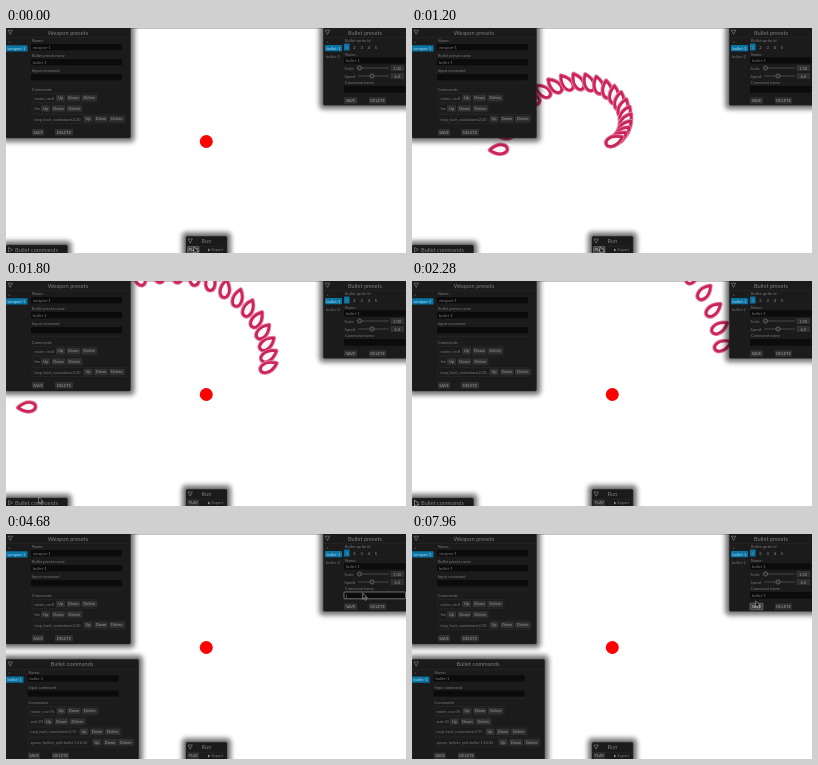
Write an HTML page that moves like this. It is 400 px wide and 225 px high and loops after 8000 ms.

```html
<!DOCTYPE html>
<html>
<head>
<meta charset="utf-8">
<style>
html, body { margin: 0; width: 100%; height: 100%; overflow: hidden; background: #fff; }
svg { display: block; width: 100vw; height: 100vh; }
text { font: 4px Lato, "Open Sans", sans-serif; fill: #787878; white-space: pre; }
.title { font-size: 5.7px; fill: #7c7c7c; text-anchor: middle; }
.button { text-anchor: middle; fill: #979797; }
.hot rect { fill: #404040; stroke: #8c8c8c; stroke-width: .5; }
.hot text { fill: #ccc; }
</style>
</head>
<body>
<svg id="stage" viewBox="0 0 400 225">
  <defs>
    <filter id="blur" x="-50%" y="-50%" width="200%" height="200%"><feGaussianBlur stdDeviation="2.8"/></filter>
    <path id="leaf" d="M9 0C4 -4 -1 -5 -4.5 -4C-9.5 -2.5 -9.5 2.5 -4.5 4C-1 5 4 4 9 0Z" stroke-linejoin="round"/>
    <g id="drop">
      <use href="#leaf" fill="#fff" stroke="#e27c9c" stroke-width="4.6"/>
      <use href="#leaf" fill="#fff6f8" stroke="#cb2459" stroke-width="2.7"/>
    </g>
  </defs>
  <rect width="400" height=".7" fill="#aaa"/>
  <circle id="ball" cx="200.3" cy="113.5" r="6.5" fill="#f00"/>
  <g id="bullets"></g>
  <g id="panels"></g>
  <path id="cursor" d="M0 0V6.2L1.5 4.9L2.6 7.3L3.7 6.8L2.7 4.5H4.6Z" fill="#111" stroke="#ccc" stroke-width=".5"/>
</svg>
<script>
const $ = id => document.getElementById(id);
const BLUE = '#0a74a4', FIELD = '#0b0b0b', EDGE = '#2e2e2e';

const rect = (x, y, w, h, fill, more = '') =>
  `<rect x="${x}" y="${y}" width="${w}" height="${h}" fill="${fill}" ${more}/>`;
const text = (x, y, s, more = '') => `<text x="${x}" y="${y}" ${more}>${s}</text>`;
const button = (x, y, w, s, id = '') =>
  `<g id="${id}">${rect(x, y, w, 6.5, '#313131', 'rx=".7"')}${text(x + w / 2, y + 4.7, s, 'class="button"')}</g>`;
const field = (x, y, w, s = '', more = '') =>
  rect(x, y, w, 6.2, FIELD, `rx=".6" ${more}`) + text(x + 2, y + 4.5, s);
const chip = (x, y, w, s) => rect(x, y, w, 6.3, BLUE, 'rx=".6"') + text(x + 1.5, y + 4.6, s, 'style="fill:#b4d8e8"');

function panel(x, y, w, h, title, titleX, open = true) {
  const ty = y + 4.7;
  const arrow = open ? `M${x + 2} ${ty - 2}h4.4l-2.2 4.2z` : `M${x + 2.5} ${ty - 2.2}v4.4l4 -2.2z`;
  return rect(x - 4, y - 4, w + 8, h + 8, '#000', 'rx="4" opacity=".55" filter="url(#blur)"') +
    rect(x, y, w, h, '#1b1b1b', `rx="1.5" stroke="${EDGE}" stroke-width=".5"`) +
    `<path d="${arrow}" fill="none" stroke="#8c8c8c" stroke-width=".6"/>` +
    text(titleX, y + 7, title, 'class="title"') +
    (open ? rect(x, y + 9.8, w, .4, EDGE) : '');
}

// One command line with its three buttons
function row(x, y, s, bx) {
  return rect(x, y, bx + 42 - x, 9, 'none', 'rx="1" stroke="#2a2a2a" stroke-width=".5"') +
    text(x + 2.5, y + 6, s, 'style="font-size:3.8px"') +
    button(bx, y + 1.2, 9, 'Up') + button(bx + 10.7, y + 1.2, 13.5, 'Down') + button(bx + 25.5, y + 1.2, 15.5, 'Delete');
}

const slider = (y, name, knob, value) => text(338.5, y + 1.5, name) +
  rect(352, y - .8, 31, 1.6, '#3a3a3a', 'rx=".8"') +
  `<circle cx="${knob}" cy="${y}" r="2.1" fill="#2c2c2c" stroke="#808080" stroke-width=".6"/>` +
  rect(384.5, y - 3.1, 13.5, 6.2, '#313131', 'rx=".6"') + text(391.2, y + 1.5, value, 'class="button"');

const editor = (x, y, name) => text(x + 1, y + 14.3, 'Name:') + field(x, y + 16, 91, name);

const weapon = panel(0, -.5, 124.5, 110.5, 'Weapon presets', 62) +
  text(2, 14.5, '+') + chip(0, 17.3, 21.5, 'weapon-1') +
  editor(25, 0, 'weapon-1') +
  text(26, 29.4, 'Bullet preset name') + field(25, 31, 91, 'bullet-1') +
  text(26, 44.3, 'Input command') + field(25, 46, 91) +
  rect(25, 55.5, 91, .4, EDGE) + text(26, 62.5, 'Commands') +
  row(26, 65.5, 'rotate_cw:8', 50) + row(26, 76, 'fire', 35) +
  row(26, 86.5, 'loop_back_countdown:2:20', 77.5) +
  button(26, 101, 12, 'SAVE') + button(49, 101, 18, 'DELETE');

const presets = panel(317.3, -.5, 90, 77.8, 'Bullet presets', 359) +
  text(320.5, 14.5, '+') + chip(319, 17, 17, 'bullet-1') + text(320, 29.5, 'bullet-2') +
  text(339, 14.2, 'Bullet sprite id') + rect(338, 15.6, 5.6, 7, BLUE, 'rx=".6"') +
  [341, 348.5, 355.7, 363, 370].map((x, i) => text(x, 20.8, i + 1, 'class="button"')).join('') +
  text(339, 28, 'Name:') + field(338, 29.2, 61.5, 'bullet-1') +
  slider(40, 'Scale', 353.5, '1.00') + slider(48, 'Speed', 366, '6.0') +
  text(339, 56.2, 'Command name:') + rect(338, 58, 61.5, 6.8, FIELD, 'id="box" rx=".6" stroke-width=".6"') +
  text(340, 62.8, '<tspan id="typed"></tspan><tspan id="caret" fill="#ddd">|</tspan>') +
  button(338, 69.3, 13, 'SAVE', 'save') + button(363, 69.3, 17, 'DELETE');

const run = panel(180, 208.3, 41, 22, 'Run', 200.5) +
  button(181.5, 218.6, 11.5, 'PLAY', 'play') +
  '<path d="M202 220.5l2.4 1.5l-2.4 1.5z" fill="#8c8c8c"/>' + text(205.5, 223.4, 'Export');

const closed = panel(0, 217, 61.5, 14, 'Bullet commands', 30.5, false);

const opened = panel(0, 125.3, 132.7, 105, 'Bullet commands', 66) +
  text(2, 140, '+') + chip(0, 142.5, 17.5, 'bullet-1') +
  editor(21.5, 125.2, 'bullet-1') +
  text(22.5, 154.6, 'Input command') + field(21.5, 156.4, 91) +
  rect(21.5, 164.4, 91, .4, EDGE) + text(22.5, 169.6, 'Commands') +
  row(22, 172.5, 'rotate_ccw:76', 50.5) + row(22, 183, 'wait:20', 38) +
  row(22, 193.3, 'loop_back_countdown:2:15', 73.5) +
  row(22, 203.8, 'spawn_bullets_split:bullet-1:16:32', 86.5) +
  button(22, 218.6, 12, 'SAVE') + button(46, 218.6, 17, 'DELETE');

$('panels').innerHTML = weapon + presets + run + `<g id="closed">${closed}</g><g id="opened">${opened}</g>`;

const SHOTS = 21, FIRST = 166, GAP = 51, SPEED = .11, TURN = 8;
$('bullets').innerHTML = '<use href="#drop"/>'.repeat(SHOTS);
const bullets = [...$('bullets').children];

// time, x, y of the pointer
const path = [
  [0, 188, 219], [1280, 188, 219], [1780, 32.7, 216], [2200, 2.5, 219], [2640, 2.5, 219],
  [3300, 322.5, 72], [3480, 322.5, 72], [4040, 356.7, 59], [6680, 356.7, 59], [7440, 343.7, 67], [8000, 343.7, 67]
];
const keys = [4880, 5120, 5360, 5560, 5680, 5800, 5920, 6120];

function pointer(t) {
  const i = path.findIndex(p => p[0] > t);
  const [t0, x0, y0] = path[i - 1], [t1, x1, y1] = path[i];
  const u = (t - t0) / (t1 - t0), e = u * u * (3 - 2 * u);
  return [x0 + (x1 - x0) * e, y0 + (y1 - y0) * e];
}

const show = (id, on) => $(id).style.display = on ? '' : 'none';

function draw(now) {
  const t = now % 8000;
  bullets.forEach((b, i) => {
    const age = t - FIRST - i * GAP, r = age * SPEED, deg = 176 + i * TURN, a = deg * Math.PI / 180;
    b.style.display = age >= 0 && r < 260 ? '' : 'none';
    b.setAttribute('transform', `translate(${200.5 + r * Math.cos(a)} ${113.5 + r * Math.sin(a)}) rotate(${deg})`);
  });
  show('ball', t < FIRST || t > 1240);
  show('closed', t < 2520);
  show('opened', t >= 2520);
  $('play').classList.toggle('hot', t < 1320);
  $('save').classList.toggle('hot', t > 7200);

  const focus = t >= 4680 && t < 7480;
  $('box').setAttribute('stroke', focus ? '#b0b0b0' : 'none');
  $('typed').textContent = 'bullet-1'.slice(0, keys.filter(k => k <= t).length);
  show('caret', focus);
  $('cursor').setAttribute('transform', `translate(${pointer(t)})`);
  requestAnimationFrame(() => draw(performance.now() - start));
}
const start = performance.now();
draw(0);
</script>
</body>
</html>
```
